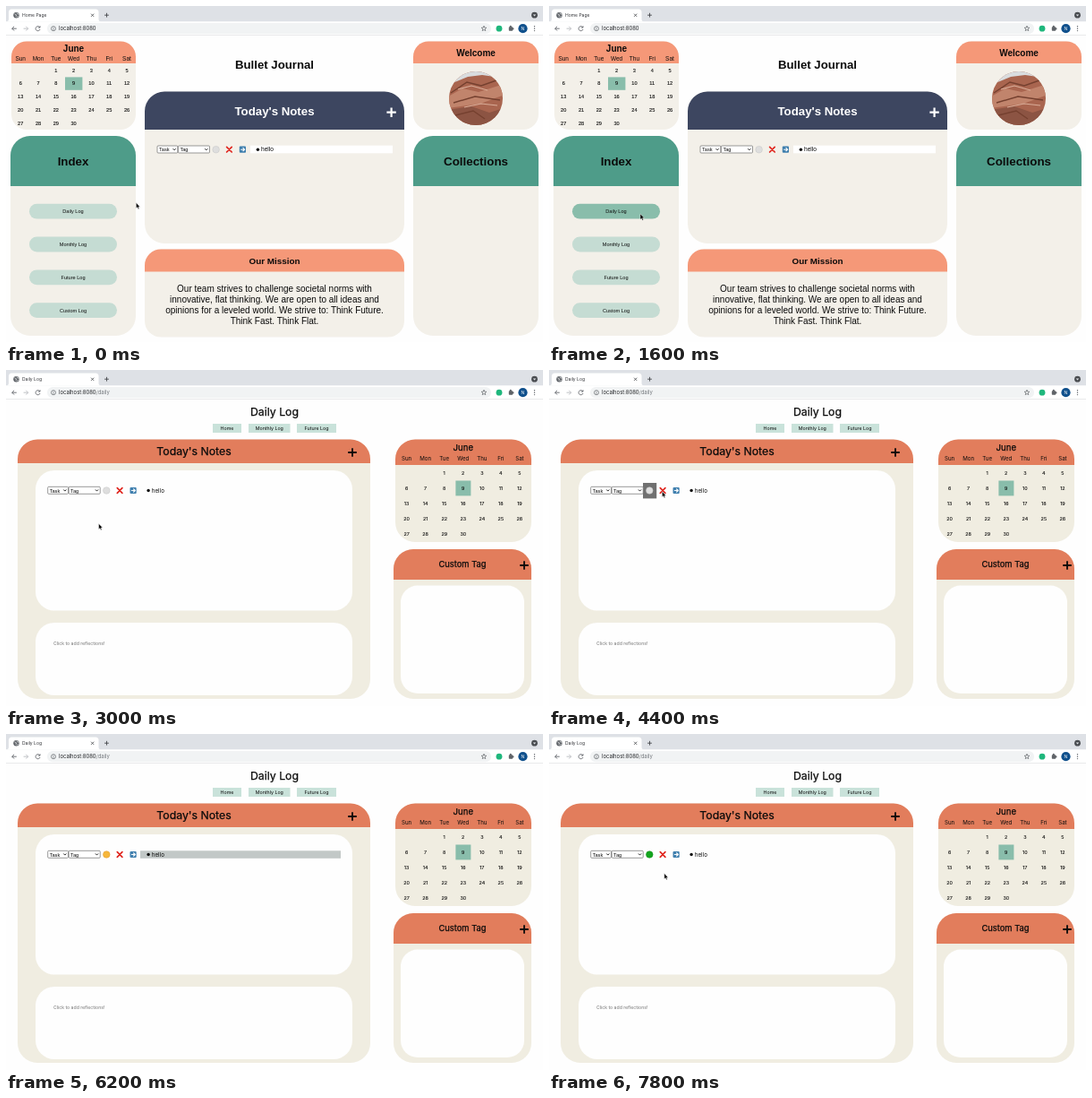
An HTML page that plays this animation: 600x375 px, repeating every 8 s.

```html
<!DOCTYPE html>
<html lang="en">
<head>
<meta charset="utf-8">
<title>Journal</title>
<style>
html, body { margin: 0; width: 100%; height: 100%; overflow: hidden; background: #fefefe; }
svg { display: block; width: 600px; height: 375px; }
text { white-space: pre; }
.arial { font-family: "Liberation Sans", Arial, sans-serif; }
.inter { font-family: Inter, sans-serif; }
</style>
</head>
<body>
<svg id="stage" viewBox="0 0 600 375" xmlns="http://www.w3.org/2000/svg"></svg>
<script>
const INK = '#0b0b0b', CORAL = '#f59878', RUST = '#e27d5c', GREEN = '#4e9c89',
      SAGE = '#89bdab', MINT = '#c5dcd3', SAND = '#f3f0e9', CREAM = '#f0ede1';

const rect = (x, y, x2, y2, fill, r = 0, more = '') =>
  `<rect x="${x}" y="${y}" width="${x2 - x}" height="${y2 - y}" rx="${r}" fill="${fill}" ${more}/>`;
const circle = (x, y, r, fill, more = '') => `<circle cx="${x}" cy="${y}" r="${r}" fill="${fill}" ${more}/>`;
const line = (d, color, width = 1, more = '') =>
  `<path d="${d}" fill="none" stroke="${color}" stroke-width="${width}" ${more}/>`;
const group = (id, body, more = '') => `<g id="${id}" ${more}>${body}</g>`;

// Text is centred on y; x is its centre unless an anchor is given.
function text(s, x, y, size, { fill = INK, anchor = 'middle', bold = false, face = 'arial', thick = 0 } = {}) {
  const stroke = thick ? `stroke="${fill}" stroke-width="${thick}"` : '';
  return `<text class="${face}" x="${x}" y="${y + size * 0.36}" font-size="${size}" fill="${fill}" ` +
    `text-anchor="${anchor}" font-weight="${bold ? 700 : 400}" ${stroke}>${s}</text>`;
}

// Rounded card with a coloured header that shares the top corners.
function panel(x, y, x2, y2, r, headY, headColor, body) {
  const head = `<path d="M${x} ${headY}V${y + r}a${r} ${r} 0 0 1 ${r} ${-r}H${x2 - r}a${r} ${r} 0 0 1 ${r} ${r}V${headY}z" fill="${headColor}"/>`;
  return rect(x, y, x2, y2, body, r) + head;
}

function calendar(x, step, headY, y, rowStep, headSize, daySize, face) {
  const names = ['Sun', 'Mon', 'Tue', 'Wed', 'Thu', 'Fri', 'Sat'];
  let out = names.map((n, i) => text(n, x + i * step, headY, headSize, { face })).join('');
  for (let day = 1; day <= 30; day++) {
    const cell = day + 1;
    out += text(day, x + (cell % 7) * step, y + Math.floor(cell / 7) * rowStep, daySize, { face, thick: 0.1 });
  }
  return out;
}

const plus = (x, y, r, color, w) => line(`M${x - r} ${y}h${2 * r}M${x} ${y - r}v${2 * r}`, color, w);

function select(x, x2, label) {
  return rect(x, 156, x2, 164, '#fff', 1, 'stroke="#6d6d6d" stroke-width=".7"') +
    text(label, x + 2, 160.2, 5.6, { anchor: 'start' }) +
    line(`M${x2 - 5.2} 159.2l1.5 1.6l1.5 -1.6`, INK, 0.9);
}

function noteRow(dotId, face, size) {
  return select(169, 191.8, 'Task') + select(192.4, 227.5, 'Tag') +
    circle(234.6, 160.2, 3.8, '#dedede', `id="${dotId}" stroke="#c4c4c4" stroke-width=".5"`) +
    line('M246.6 157.4l5.6 5.6M252.2 157.4l-5.6 5.6', '#e0261f', 1.7, 'stroke-linecap="round"') +
    rect(260.8, 156.6, 268, 163.8, '#3f7fae', 1) +
    line('M262.2 160.2h4M264.6 158.2l2 2l-2 2', '#fff', 1.1) +
    circle(281.4, 160.2, 1.7, INK) +
    text('hello', 285, 160, size, { anchor: 'start', face });
}

function browser() {
  const grey = '#5f6368';
  const star = Array.from({ length: 10 }, (_, i) => {
    const r = i % 2 ? 1.3 : 3, a = i * Math.PI / 5 - Math.PI / 2;
    return `${534 + r * Math.cos(a)},${25.2 + r * Math.sin(a)}`;
  }).join(' ');
  return rect(0, 0, 600, 17.5, '#dee1e6') +
    '<path d="M0 17.5q3 0 3 -3V7q0 -3.5 3.5 -3.5H100q3.5 0 3.5 3.5V14.5q0 3 3 3z" fill="#fff"/>' +
    circle(11.5, 10.2, 3.2, grey) + line('M9.5 8.8l2 1l-.5 2M12 7.5l1 1.4l1.2 .3M12.2 12.6l1.4 -1.6', '#fff', 0.7) +
    line('M95 8.7l3.2 3.2M98.2 8.7l-3.2 3.2', '#44474b', 0.8) + plus(112.5, 10.2, 2.4, '#44474b', 0.9) +
    circle(590.5, 10.2, 3.4, '#4a4d51') + '<path d="M588.8 9.4h3.4l-1.7 2.1z" fill="#dee1e6"/>' +
    rect(0, 17.5, 600, 32.5, '#fff') + rect(46, 19, 542, 31.3, '#f1f3f4', 6.1) +
    line('M0 32.5H600', '#dcdde0', 0.6) +
    line('M11.8 25.2h-5M9.1 22.8l-2.4 2.4l2.4 2.4', grey, 0.9) +
    line('M19.6 25.2h5M22.3 22.8l2.4 2.4l-2.4 2.4', '#b9bcc0', 0.9) +
    line('M37.7 23.8a2.5 2.5 0 1 0 .3 2.2M38 22.3v1.8h-1.8', grey, 0.9) +
    circle(53, 25.2, 2.5, 'none', `stroke="${grey}" stroke-width=".7"`) + line('M53 24.8v1.8M53 23.5v.7', grey, 0.7) +
    `<polygon points="${star}" fill="none" stroke="${grey}" stroke-width=".7"/>` +
    circle(551, 25.2, 3.4, '#1fb77c') +
    rect(561.8, 23.2, 566.2, 27.8, grey, 0.7) + circle(563.8, 22.9, 1.1, grey) + circle(566.4, 25.4, 1.1, grey) +
    circle(577.5, 25.2, 5.1, '#10508c') + text('N', 577.5, 25.2, 5, { fill: '#fff', face: 'inter' }) +
    [22.8, 25.2, 27.6].map(y => circle(590.5, y, 0.7, grey)).join('');
}

const tabLabel = (title, path) =>
  text(title, 18, 10.2, 5, { anchor: 'start', face: 'inter', fill: '#303236' }) +
  text(`localhost:8080<tspan fill="#73777c">${path}</tspan>`, 59, 25.1, 5.9, { anchor: 'start', face: 'inter', fill: '#222427' });

function homePage() {
  const bold = { bold: true };
  const links = ['Daily Log', 'Monthly Log', 'Future Log', 'Custom Log'].map((label, i) => {
    const y = 229.2 + i * 36.8;
    return rect(26, y - 8.4, 124, y + 8.4, MINT, 8.4, i ? '' : 'id="dailyLink"') + text(label, 75, y, 5.6);
  }).join('');
  const mission = [
    'Our team strives to challenge societal norms with',
    'innovative, flat thinking. We are open to all ideas and',
    'opinions for a leveled world. We strive to: Think Future.',
    'Think Fast. Think Flat.'
  ].map((s, i) => text(s, 300, 315.8 + i * 11.8, 10)).join('');
  const photo = '<g clip-path="url(#round)">' + rect(494, 72, 556, 134, '#a9654f') +
    '<path d="M494 72H556V84L546 79L532 77L516 79L494 88z" fill="#d9dcde"/>' +
    '<path d="M494 101L510 92L528 96L557 87V99L530 109L494 114z" fill="#c1846c"/>' +
    '<path d="M494 116L520 112L540 119L556 114V134H494z" fill="#8c5443"/>' +
    line('M497 97L515 85L531 89L548 83M500 108L524 101L552 105M502 122L522 117L535 126', '#75402f', 1.4) +
    line('M505 93L520 89L538 94M512 113L531 109L549 111', '#d9ac98', 1.2) + '</g>';
  return tabLabel('Home Page', '') +
    panel(6, 39.5, 145, 138, 17, 64, CORAL, SAND) + text('June', 75.5, 47.2, 10, bold) +
    rect(66, 79.4, 85.4, 93.8, SAGE) + calendar(16.2, 19.8, 58.6, 71.7, 14.7, 6.5, 5.6, 'arial') +
    panel(5, 145, 145, 368, 22, 201, GREEN, SAND) + text('Index', 75, 173, 13.3, bold) + links +
    text('Bullet Journal', 300, 65, 13.2, bold) +
    panel(155, 95.5, 445, 265, 22, 138, '#3d4660', SAND) +
    text("Today's Notes", 300, 117.5, 13.25, { bold: true, fill: '#fff' }) + plus(430.6, 118.7, 5.2, '#fff', 2.2) +
    rect(273, 155.7, 432, 164.3, '#fff') + noteRow('homeDot', 'arial', 6.6) +
    panel(155, 271.5, 445, 369.5, 18, 296.5, CORAL, SAND) + text('Our Mission', 300, 284, 9.9, bold) + mission +
    panel(455, 39.5, 595, 138, 17, 64, CORAL, SAND) + text('Welcome', 525, 52, 10, bold) + photo +
    panel(455, 145, 595, 368, 22, 201, GREEN, SAND) + text('Collections', 525, 173, 13.35, bold);
}

function dailyPage() {
  const face = 'inter', title = { face, thick: 0.25 };
  const nav = [['Home', 231, 263], ['Monthly Log', 271, 317.5], ['Future Log', 325, 369]]
    .map(([s, a, b]) => rect(a, 60, b, 70, '#c9e2da') + text(s, (a + b) / 2, 65, 5.3, { face })).join('');
  return tabLabel('Daily Log', '/daily') +
    text('Daily Log', 300, 46.5, 12.3, title) + nav +
    panel(13, 77.5, 407, 367, 22, 104, RUST, CREAM) + text("Today's Notes", 210, 90.6, 12.3, title) +
    plus(387, 92, 4.8, INK, 1.8) +
    rect(33, 112, 387, 268.5, '#fefefe', 21) + rect(33, 282, 387, 363, '#fefefe', 21) +
    text('Click to add reflections!', 53, 305, 5.15, { face, anchor: 'start', fill: '#757575' }) +
    panel(435, 77.5, 587, 192, 22, 106, RUST, CREAM) + text('June', 510.8, 86.8, 9.6, title) +
    rect(502.4, 123.5, 519.4, 140.4, SAGE) + calendar(447.6, 21.05, 99, 114.6, 17.15, 6.2, 5.4, face) +
    panel(433, 200, 587, 367, 22, 234, RUST, CREAM) + text('Custom Tag', 510, 217, 9.4, title) +
    plus(579, 218, 4.8, INK, 1.8) + rect(441, 240.5, 579, 361, '#fefefe', 19) +
    group('note',
      rect(150, 130.3, 374, 138.8, '#c2c8c7', 0, 'id="noteHover"') +
      rect(105, 126, 120.2, 143.4, '#707070', 0, 'id="dotHover"') +
      group('dailyRow', noteRow('dailyDot', face, 6.3), 'transform="translate(-122.3 -25.7)"')) +
    group('status', rect(-2, 366, 200, 377, '#dfe1e5', 2, 'stroke="#b5b8bc" stroke-width=".6"') +
      text('Waiting for localhost...', 2, 370.8, 4.9, { face, anchor: 'start', fill: '#3c4043' }));
}

const stage = document.getElementById('stage');
stage.innerHTML = '<clipPath id="round"><circle cx="525" cy="103" r="30"/></clipPath>' +
  rect(0, 0, 600, 375, '#fefefe') + browser() + group('home', homePage()) + group('daily', dailyPage()) +
  group('cursor', '<path d="M0 0V6.2L1.4 5L2.4 7.2L3.4 6.7L2.5 4.6H4.3z" fill="#000" stroke="#fff" stroke-width=".4"/>');

// Pointer stops: [ms, x, y]; a stop without a position hides the pointer.
const stops = [
  [0, 145.4, 219.6], [800, 141, 221], [1000, 136, 223], [1200, 129, 226], [1400, 110, 231],
  [1600, 102, 232], [3000, 103.6, 171.5], [3800, 105, 160], [4000, 107, 148], [4200, 111, 135],
  [4400, 126.4, 135.6], [4600, 112, 136], [5000, 110, 190], [5200, 104, 169], [5400],
  [6400, 126, 175], [6600, 126, 193], [7000, 115, 150], [7200, 113, 136], [7400, 122, 148], [7600, 128.8, 155.6]
];
const dots = [[0, '#dedede', '#c4c4c4'], [4800, '#f6b73c', '#e0962b'], [7200, '#14a51e', '#0f8a18']];

const LOOP = 8000;
const $ = id => document.getElementById(id);
const show = (id, on) => $(id).setAttribute('visibility', on ? 'inherit' : 'hidden');
const at = (table, t) => table.findLast(row => row[0] <= t);

function draw(t) {
  const within = (a, b) => t >= a && t < b;
  show('home', t < 1800);
  show('daily', t >= 1800);
  $('dailyLink').setAttribute('fill', within(1400, 1800) ? SAGE : MINT);
  show('status', within(1800, 2200));
  show('note', t >= 2200);
  show('dotHover', within(4200, 5000));
  show('noteHover', within(5400, 6400));
  const [, fill, edge] = at(dots, t);
  $('dailyDot').setAttribute('fill', fill);
  $('dailyDot').setAttribute('stroke', edge);
  const [, x, y] = at(stops, t);
  show('cursor', x !== undefined);
  if (x !== undefined) $('cursor').setAttribute('transform', `translate(${x} ${y})`);
}

// Children of a hidden page inherit its visibility, so hide whole pages by display.
function frame() {
  const t = performance.now() % LOOP;
  draw(t);
  $('home').style.display = t < 1800 ? '' : 'none';
  $('daily').style.display = t < 1800 ? 'none' : '';
  requestAnimationFrame(frame);
}
frame();
</script>
</body>
</html>
```
